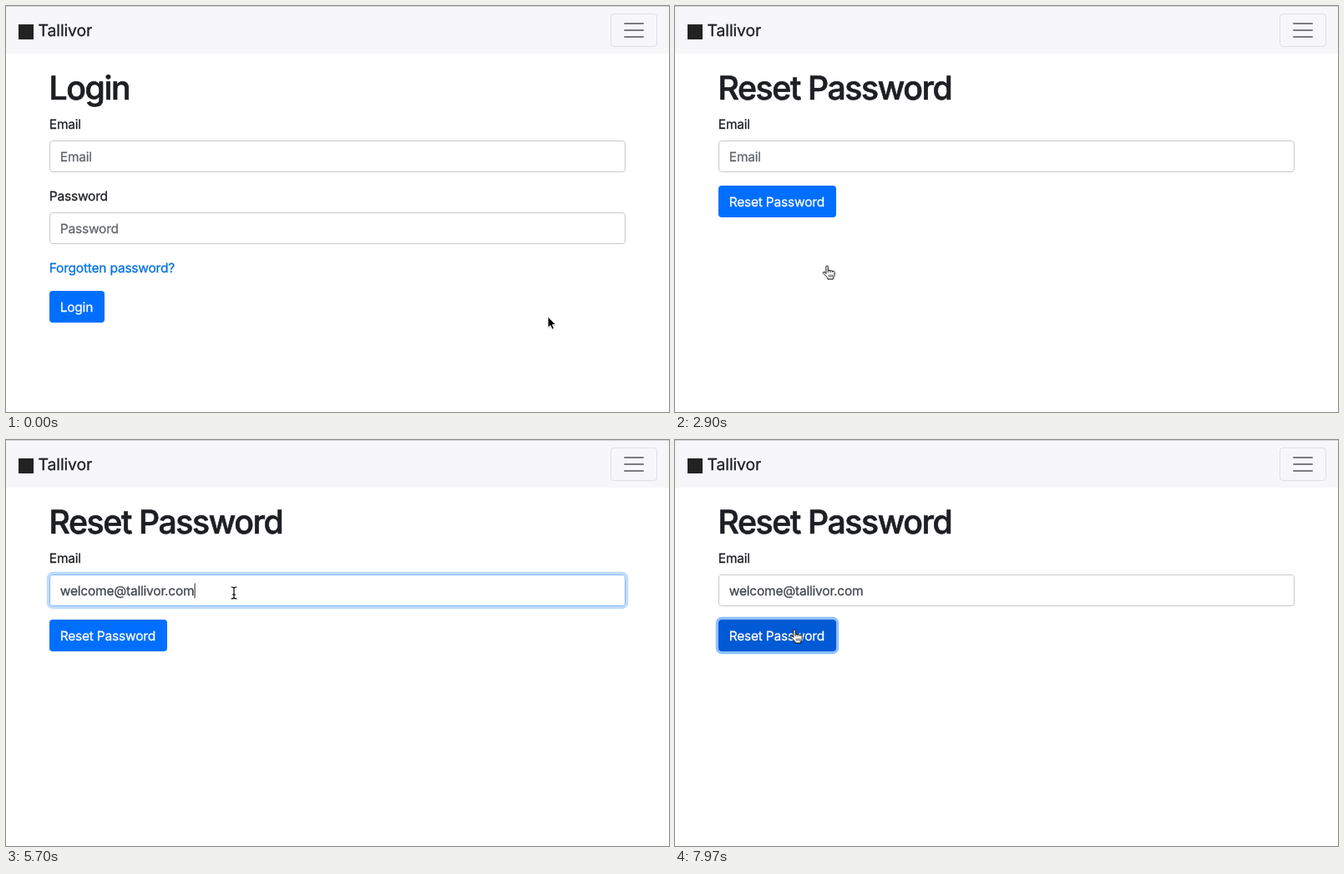
An HTML page that plays this animation: 794 px wide and 486 px high, repeating every 8 s.

```html
<!DOCTYPE html>
<html lang="en">
<head>
<meta charset="utf-8">
<title>Reset password</title>
<style>
html, body { margin: 0; width: 100%; height: 100%; overflow: hidden; background: #fff; }
svg { display: block; width: 794px; height: 486px; }
text {
  font: 400 15.5px Inter, "Open Sans", sans-serif;
  letter-spacing: -.21px;
  font-optical-sizing: none;
  text-rendering: geometricPrecision;
  color: #1d1f23;
  fill: currentColor;
  stroke: currentColor;
  stroke-width: .3px;
}
.brand { font-size: 19.4px; letter-spacing: -.1px; }
.title { font-size: 39.2px; font-weight: 500; letter-spacing: -1.4px; stroke-width: .7px; }
.hint { color: #62666d; }
.typed { color: #42464d; }
.label { color: #fff; }
.field { fill: #fff; stroke: #c8c9ce; }
.button { fill: #006fff; }
.ring { fill: none; stroke-width: 3.2; opacity: 0; }

/* every animation shares the same 8 s loop */
.anim { animation: 8s linear infinite; }
.step { animation: 8s step-end infinite; }
#login { animation-name: login; }
#reset { animation-name: reset; }
#link { color: #0070e4; animation-name: link; }
#box { animation-name: box; }
#boxRing { stroke: #bfdcff; animation-name: boxRing; }
#send { animation-name: send; }
#sendRing { stroke: #8cc0ff; animation-name: sendRing; }
#cursor { animation-name: move; }
#arrow { animation-name: arrow; }
#hand { animation-name: hand; }
#beam { animation-name: beam; }

@keyframes login { 0% { visibility: visible } 36.2%, 100% { visibility: hidden } }
@keyframes reset { 0% { visibility: hidden } 36.2%, 100% { visibility: visible } }
@keyframes link {
  0% { color: #0070e4; text-decoration: none }
  21.8%, 100% { color: #004ca3; text-decoration: underline }
}
@keyframes box {
  0%, 57.1%, 97.25%, 100% { stroke: #c8c9ce }
  59%, 95.4% { stroke: #80b7fa }
}
@keyframes boxRing {
  0%, 57.1%, 97.25%, 100% { opacity: 0 }
  59%, 95.4% { opacity: 1 }
}
@keyframes send {
  0%, 80.75% { fill: #006fff }
  82.6%, 95.4% { fill: #0061ea }
  97.25%, 100% { fill: #005ad6 }
}
@keyframes sendRing { 0%, 95.4% { opacity: 0 } 97.25%, 100% { opacity: 1 } }
@keyframes move {
  0% { transform: translate(649px, 372px) }
  10.9% { transform: translate(649px, 372px); animation-timing-function: cubic-bezier(.45, 0, .7, .75) }
  20.9% { transform: translate(228px, 318px); animation-timing-function: ease-out }
  22.5% { transform: translate(194px, 310px); animation-timing-function: ease-out }
  27.5% { transform: translate(182px, 311px) }
  47.5% { transform: translate(182px, 311px); animation-timing-function: cubic-bezier(.4, 0, .7, .9) }
  52.5% { transform: translate(262px, 196px); animation-timing-function: ease-out }
  56%, 74.6% { transform: translate(273px, 183px); animation-timing-function: cubic-bezier(.4, 0, .6, 1) }
  83.4% { transform: translate(153px, 222px); animation-timing-function: ease-in-out }
  92%, 100% { transform: translate(143px, 227px) }
}
@keyframes arrow {
  0% { opacity: 1 } 21.7% { opacity: 0 } 37% { opacity: 1 }
  52.9% { opacity: 0 } 78.6% { opacity: 1 } 80.75%, 100% { opacity: 0 }
}
@keyframes hand {
  0% { opacity: 0 } 21.7% { opacity: 1 } 37% { opacity: 0 } 80.75%, 100% { opacity: 1 }
}
@keyframes beam { 0% { opacity: 0 } 52.9% { opacity: 1 } 78.6%, 100% { opacity: 0 } }
</style>
</head>
<body>
<svg viewBox="0 0 794 486">
  <!-- navigation bar -->
  <rect width="794" height="57" fill="#f7f7f9"/>
  <rect width="794" height="1" fill="#d0d0d2"/>
  <rect x="15" y="22" width="18" height="18" fill="#222"/>
  <text class="brand" x="38.5" y="36">Tallivor</text>
  <rect x="724.5" y="9.5" width="55" height="39" rx="3.5" fill="none" stroke="#dfdfe2"/>
  <path d="M741 21h22M741 29h22M741 37h22" stroke="#7c7c7e" stroke-width="2" stroke-linecap="round"/>

  <text x="51.8" y="146.8">Email</text>

  <g id="login" class="step">
    <text class="title" x="51.5" y="111.7">Login</text>
    <rect class="field" x="52.5" y="161.5" width="689" height="37" rx="3.5"/>
    <text class="hint" x="64.8" y="185.8">Email</text>
    <text x="51.8" y="232.8">Password</text>
    <rect class="field" x="52.5" y="247.5" width="689" height="37" rx="3.5"/>
    <text class="hint" x="64.8" y="271.8">Password</text>
    <text id="link" class="step" x="51.8" y="318.8">Forgotten password?</text>
    <rect class="button" x="52" y="341" width="66" height="38" rx="4"/>
    <text class="label" x="64.7" y="365.8">Login</text>
  </g>

  <g id="reset" class="step">
    <text class="title" x="51.5" y="111.7">Reset Password</text>
    <rect id="boxRing" class="ring anim" x="50.4" y="159.4" width="693.2" height="41.2" rx="5.6"/>
    <rect id="box" class="field anim" x="52.5" y="161.5" width="689" height="37" rx="3.5"/>
    <text id="hint" class="hint" x="64.8" y="185.8">Email</text>
    <text id="typed" class="typed" x="64.8" y="185.8"></text>
    <rect id="caret" y="171.5" width="1" height="18" fill="#222" opacity="0"/>
    <rect id="sendRing" class="ring anim" x="50.4" y="213.4" width="144.2" height="41.2" rx="5.6"/>
    <rect id="send" class="button anim" x="52" y="215" width="141" height="38" rx="4"/>
    <text class="label" x="64.7" y="239.8">Reset Password</text>
  </g>

  <!-- pointer shapes, each with its hot spot at 0,0 -->
  <g id="cursor" class="anim">
    <g id="arrow" class="step">
      <path d="M.5 1.5V15L3.6 12 5.6 16.6 8 15.5 6 11H10z" fill="#000" opacity=".15"/>
      <path d="M0-.3V13.2L3 10.4 5 15.1 7.3 14.1 5.3 9.5H9.4z" fill="#000" stroke="#fff" stroke-width=".9"/>
    </g>
    <g id="hand" class="step" transform="translate(-5.3 -1)">
      <path d="M4 10.4V2.3a1.3 1.3 0 0 1 2.6 0V6.8q1.3-1 2.6.2 1.4-.9 2.6.4 1.8-.6 2.5 1V12q-.3 1.8-1.5 3V17H6V15.4L1 10.2q-1-1.6.5-2 1.3 0 2.5 2.2z"
        fill="#fff" stroke="#000" stroke-linejoin="round"/>
      <path d="M6.6 6.8v2.4M9.2 7v2.2M11.8 7.4v1.8M7.8 11.5v3M9.8 11.5v3M11.8 11.5v3" stroke="#000" stroke-width=".8"/>
    </g>
    <g id="beam" class="step" fill="none" stroke-linecap="round">
      <path d="M-3-7Q-1-7 0-6 1-7 3-7M0-6V6M-3 7Q-1 7 0 6 1 7 3 7M-1.5 2h3" stroke="#fff" stroke-width="2.4"/>
      <path d="M-3-7Q-1-7 0-6 1-7 3-7M0-6V6M-3 7Q-1 7 0 6 1 7 3 7M-1.5 2h3" stroke="#000" stroke-width="1.2"/>
    </g>
  </g>
</svg>
<script>
const LOOP = 8000, FOCUS = 4570, TYPE = 4970, TYPED = 5600, BLUR = 7630;
const email = "welcome@tallivor.com";
const $ = id => document.getElementById(id);
const typed = $("typed"), hint = $("hint"), caret = $("caret");
const clock = $("cursor").getAnimations()[0];

function caretOn(t) {
  if (t < FOCUS || t >= BLUR) return false;
  if (t >= TYPE && t < TYPED) return true;
  return (t - (t < TYPE ? FOCUS : TYPED)) % 1000 < 500;
}

function draw(now) {
  const t = ((clock && clock.currentTime) ?? now) % LOOP;
  const part = (t - TYPE) / (TYPED - TYPE);
  const count = part < 0 ? 0 : Math.min(email.length, 1 + Math.floor(part * (email.length - 1)));
  if (typed.textContent.length !== count) typed.textContent = email.slice(0, count);
  hint.setAttribute("opacity", count ? 0 : 1);
  caret.setAttribute("x", 65 + (count ? typed.getComputedTextLength() : 0));
  caret.setAttribute("opacity", caretOn(t) ? 1 : 0);
  requestAnimationFrame(draw);
}
requestAnimationFrame(draw);
</script>
</body>
</html>
```
